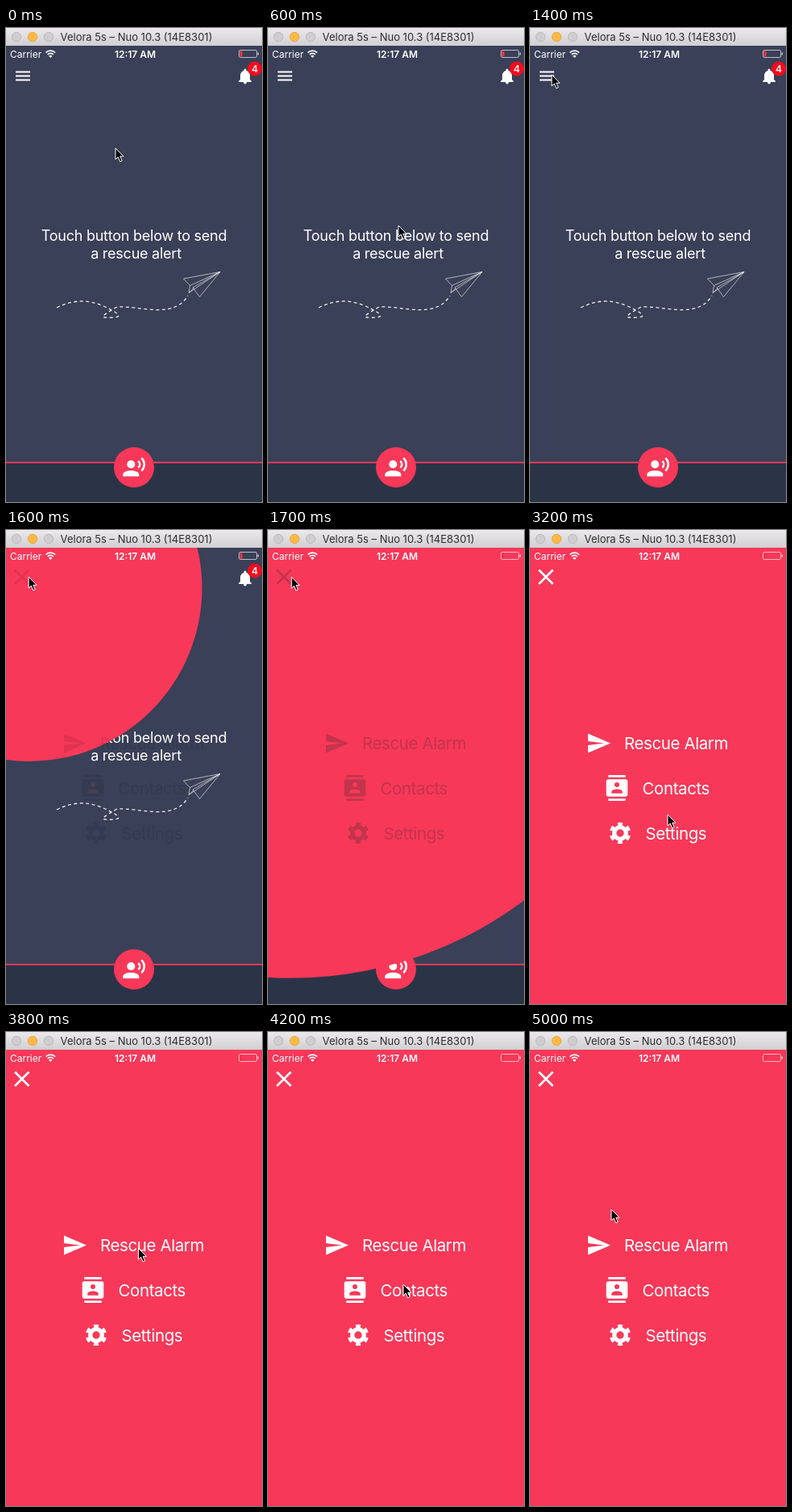
These frames come from a looping animation (318x588 px, 5100 ms). An HTML page:

```html
<!DOCTYPE html>
<html lang="en">
<head>
<meta charset="utf-8">
<title>Rescue alert menu</title>
<style>
  html, body { margin: 0; width: 100%; height: 100%; overflow: hidden; background: #394057; }
  svg { display: block; width: 318px; height: 588px; font-family: Inter, Roboto, "Open Sans", sans-serif; fill: #fff; }
  .mid { text-anchor: middle; }
  .line { fill: none; stroke: #fff; }
  .lead { font-size: 18px; letter-spacing: -.24px; }
  .item { font-size: 20.5px; letter-spacing: -.4px; }
  .status { font-size: 12px; }
  .bold { font-weight: 600; }
  .red { fill: #f73859; }
  #menu { fill: currentColor; }
  #menu .line { stroke: currentColor; }
</style>
</head>
<body>
<svg viewBox="0 0 318 588">
  <defs>
    <linearGradient id="chrome" x2="0" y2="1">
      <stop stop-color="#ebe9eb"/>
      <stop offset="1" stop-color="#d1cfd1"/>
    </linearGradient>
  </defs>

  <!-- home screen -->
  <rect width="318" height="588" fill="#394057"/>
  <path class="line" stroke-width="2" d="M12 54.5h18m-18 5h18m-18 5h18"/>
  <g transform="translate(297 50)">
    <circle cy="2" r="1.5"/>
    <circle cy="17.5" r="2"/>
    <path d="M-6 15V9A6 6.500 0 0 1 6 9V14l2 2v1H-8v-1l2-2z"/>
  </g>
  <circle cx="309" cy="50.5" r="9" fill="#fb0a1c"/>
  <text class="status bold mid" x="309" y="55">4</text>
  <text class="lead mid" x="159" y="264">Touch button below to send</text>
  <text class="lead mid" x="161.5" y="286">a rescue alert</text>
  <path class="line" stroke-width="1.3" stroke-opacity=".9" stroke-dasharray="4 3.5" d="M63 347Q92 332 121 345T134 359T121 357T138 346C165 344 208 362 226 332"/>
  <path class="line" stroke-width=".7" stroke-opacity=".85" stroke-linejoin="round" d="M266 302.5L220.5 311L228.5 319.5ZL227 328.5L228.5 319.5M227 328.5L233 323M266 302.5L232 322L240.5 333.5Z"/>
  <rect y="539" width="318" height="49" fill="#2b3447"/>
  <rect class="red" y="538" width="318" height="2"/>
  <circle class="red" cx="159" cy="545" r="25"/>
  <g transform="translate(155.3 541.3)">
    <circle r="5"/>
    <path d="M-10 15V12.5C-10 6 10 6 10 12.5V15Z"/>
    <path class="line" stroke-width="2.5" d="M9-4A5 5 0 0 1 9 4M13-8A11 11 0 0 1 13 8"/>
  </g>

  <!-- menu -->
  <circle id="reveal" class="red" cx="28.5" cy="72"/>
  <g id="menu">
    <path class="line" stroke-width="2.6" d="M11 49.500l17.500 17.500m0-17.500l-17.500 17.500"/>
    <g class="row">
      <path d="M72 252.500l28 12l-28 12v-9.500l20-2.500l-20-2.500z"/>
      <text class="item" x="117" y="272">Rescue Alarm</text>
    </g>
    <g class="row">
      <g transform="translate(108 320)">
        <path class="line" stroke-width="2.7" d="M-10.700-14.700h21.400m-21.400 29.400h21.400"/>
        <rect x="-13.300" y="-10.700" width="26.600" height="21.400" rx="2.700"/>
        <circle class="red" cy="-4" r="3"/>
        <path class="red" d="M-6.700 6.700v-2C-6.700 .3 6.700 .3 6.700 4.700v2z"/>
      </g>
      <text class="item" x="139.5" y="328">Contacts</text>
    </g>
    <g class="row">
      <g class="line" transform="translate(112 376)">
        <circle r="7.300" stroke-width="5.300"/>
        <circle r="11.200" stroke-width="4.200" pathLength="12" stroke-dasharray="1" stroke-dashoffset="1.500"/>
      </g>
      <text class="item" x="143.5" y="384">Settings</text>
    </g>
  </g>

  <!-- status bar -->
  <text class="status" x="5" y="37">Carrier</text>
  <path class="line" stroke-width="1.7" d="M49.500 30.600a8 8 0 0 1 11.600 0m-9.400 2.400a5 5 0 0 1 7.200 0"/>
  <path d="M55.300 37l-2.200-2.300a3.200 3.200 0 0 1 4.400 0z"/>
  <text class="status bold mid" x="160.5" y="37">12:17 AM</text>
  <rect class="line" x="289.5" y="27.5" width="22" height="9" rx="1.8" stroke-opacity=".65"/>
  <rect x="290.5" y="28.5" width="3" height="7" fill="#fa3048"/>
  <rect x="312.5" y="30.5" width="1.5" height="3" opacity=".7"/>

  <!-- window title -->
  <rect width="318" height="22" fill="url(#chrome)"/>
  <g fill="#cfcdcf" stroke="#b5b3b5" stroke-width=".8">
    <circle cx="13" cy="11" r="5.7"/>
    <circle cx="33" cy="11" r="5.7" fill="#fdb944" stroke="#dfa03a"/>
    <circle cx="53" cy="11" r="5.7"/>
  </g>
  <text class="mid" x="162" y="16" font-size="13" fill="#2e2e2e">Velora 5s – Nuo 10.3 (14E8301)</text>

  <path id="cursor" fill="#000" stroke="#fff" stroke-linejoin="round" d="M0 0V14L3.200 11L5.700 16.800L8.200 15.700L5.700 10.200H10Z"/>
</svg>
<script>
  const LOOP = 5100, TICK = 100;
  const OPEN = 1400, FADE = 1500, FIRST_TAP = 3900, TAP_GAP = 500;

  // Where the pointer turns: ms, x, y
  const turns = [
    [0, 136, 149], [300, 29, 36], [600, 162, 245], [1100, 29, 33],
    [1400, 27, 58], [2200, 34, 59], [2700, 229, 300], [3200, 171, 353],
    [3700, 164, 263], [4200, 168, 313], [4900, 222, 368], [5000, 101, 220]
  ];

  const find = s => document.querySelector(s);
  const cursor = find('#cursor'), reveal = find('#reveal'), menu = find('#menu');
  const rows = document.querySelectorAll('.row');

  const clamp = p => Math.min(1, Math.max(0, p));
  const smooth = p => p * p * (3 - 2 * p);
  const mix = (a, b, p) => a + (b - a) * p;

  function pointer(t) {
    const i = turns.findLastIndex(stop => stop[0] <= t);
    const [t0, x0, y0] = turns[i];
    const [t1, x1, y1] = turns[i + 1] || [LOOP, x0, y0];
    const p = smooth((t - t0) / (t1 - t0));
    return [mix(x0, x1, p), mix(y0, y1, p)];
  }

  function draw(t) {
    cursor.setAttribute('transform', `translate(${pointer(t)})`);

    const grow = clamp((t - OPEN) / 400);
    reveal.setAttribute('r', 860 * grow ** 2);

    // Labels brighten from black to white as they fade in.
    const shown = clamp((t - FADE) / 500);
    const level = 255 * shown ** 2;
    menu.style.opacity = shown ** 1.5;
    menu.style.color = `rgb(${level}, ${level}, ${level})`;

    rows.forEach((row, i) => {
      row.style.opacity = t === FIRST_TAP + i * TAP_GAP ? .5 : 1;
    });
  }

  const start = performance.now();
  function frame() {
    const ms = Math.max(0, performance.now() - start);
    draw(Math.floor(ms / TICK) * TICK % LOOP);
    requestAnimationFrame(frame);
  }
  frame();
</script>
</body>
</html>
```
